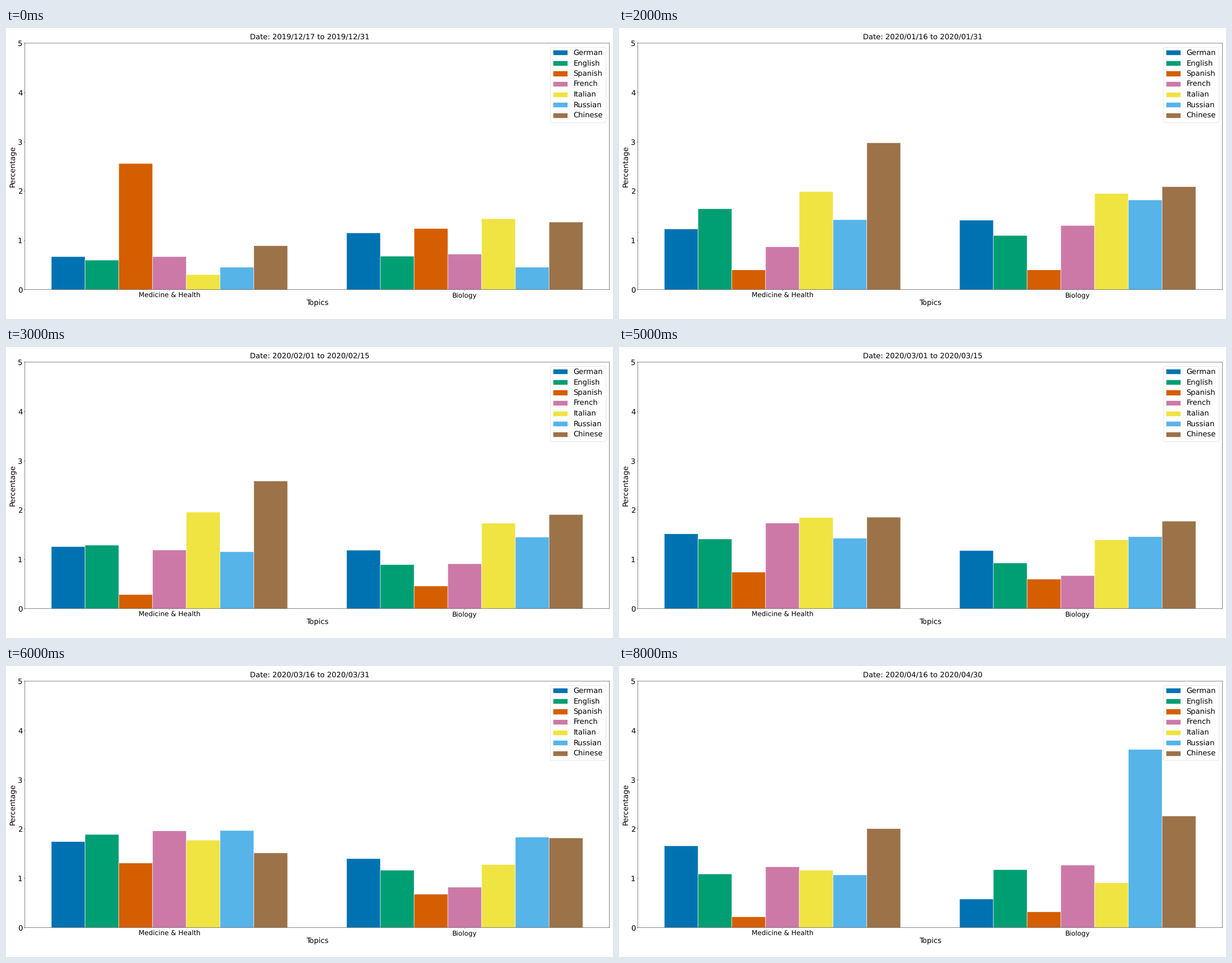
Write a matplotlib script that moves like this. It is 1080x518 px and loops after 9000 ms.

```python
import numpy as np
import matplotlib.pyplot as plt
from matplotlib.animation import FuncAnimation

W, H, DPI = 1080, 518, 43.2
LEFT, RIGHT, TOP, BOTTOM = 33.5, 1073.5, 27, 465.8
plt.rcParams.update({
    "font.family": "DejaVu Sans",
    "font.size": 22,
    "text.hinting": "none",
    "toolbar": "None",
})

TOPICS = ["Medicine & Health", "Biology"]

# Shares at the key steps; the steps between lie halfway
KEYS = [0, 2, 4, 6, 7, 8]
SERIES = {
    "German": ("#0072b2", [0.67, 1.23, 1.29, 1.745, 0.96, 1.66],
               [1.15, 1.41, 0.96, 1.4, 1.02, 0.58]),
    "English": ("#009e73", [0.6, 1.64, 0.935, 1.89, 0.98, 1.09],
                [0.68, 1.1, 0.69, 1.165, 0.565, 1.175]),
    "Spanish": ("#d55e00", [2.56, 0.4, 0.17, 1.31, 0.37, 0.22],
                [1.24, 0.4, 0.52, 0.68, 0.18, 0.32]),
    "French": ("#cc79a7", [0.67, 0.87, 1.51, 1.965, 1.13, 1.235],
               [0.72, 1.3, 0.52, 0.82, 1.67, 1.27]),
    "Italian": ("#f0e442", [0.305, 1.99, 1.925, 1.775, 1.73, 1.165],
                [1.44, 1.95, 1.515, 1.28, 1.315, 0.91]),
    "Russian": ("#56b4e9", [0.455, 1.42, 0.89, 1.97, 4.02, 1.07],
                [0.455, 1.82, 1.085, 1.835, 4.65, 3.615]),
    "Chinese": ("#9c7248", [0.89, 2.98, 2.195, 1.515, 1.16, 2.01],
                [1.37, 2.09, 1.73, 1.82, 1.185, 2.265]),
}
BAR = 0.8 / len(SERIES)

# Half-month periods
PERIODS = ["2019/12/17 to 2019/12/31"]
for month, last in enumerate((31, 29, 31, 30), 1):
    for a, b in ((1, 15), (16, last)):
        PERIODS.append(f"2020/{month:02}/{a:02} to 2020/{month:02}/{b}")

fig = plt.figure(figsize=(25, 11.991), dpi=DPI, facecolor="white")
ax = fig.add_axes([LEFT / W, 1 - BOTTOM / H, (RIGHT - LEFT) / W, (BOTTOM - TOP) / H])

spots = np.arange(len(TOPICS))
groups = [
    ax.bar(spots - 0.4 + (i + 0.5) * BAR, 0, BAR, color=color,
           edgecolor="white", linewidth=1, snap=False, label=name)
    for i, (name, (color, *_)) in enumerate(SERIES.items())
]

for spine in ax.spines.values():
    spine.set_snap(False)
ax.set_xlim(-0.49, 1.49)
ax.set_ylim(0, 5)
ax.set_xticks(spots, TOPICS, fontsize=20)
ax.set_xlabel("Topics", labelpad=3)
ax.set_ylabel("Percentage")
ax.legend(loc="upper right", labelspacing=0.46, borderpad=0.36)
title = fig.suptitle("", fontsize=22)


def update(k):
    title.set_text("Date: " + PERIODS[k])
    for bars, (_, *topics) in zip(groups, SERIES.values()):
        for bar, points in zip(bars, topics):
            bar.set_height(np.interp(k, KEYS, points))
    return [title]


anim = FuncAnimation(fig, update, frames=len(PERIODS), interval=1000,
                     repeat=True, repeat_delay=0, blit=False)
plt.show()
```
